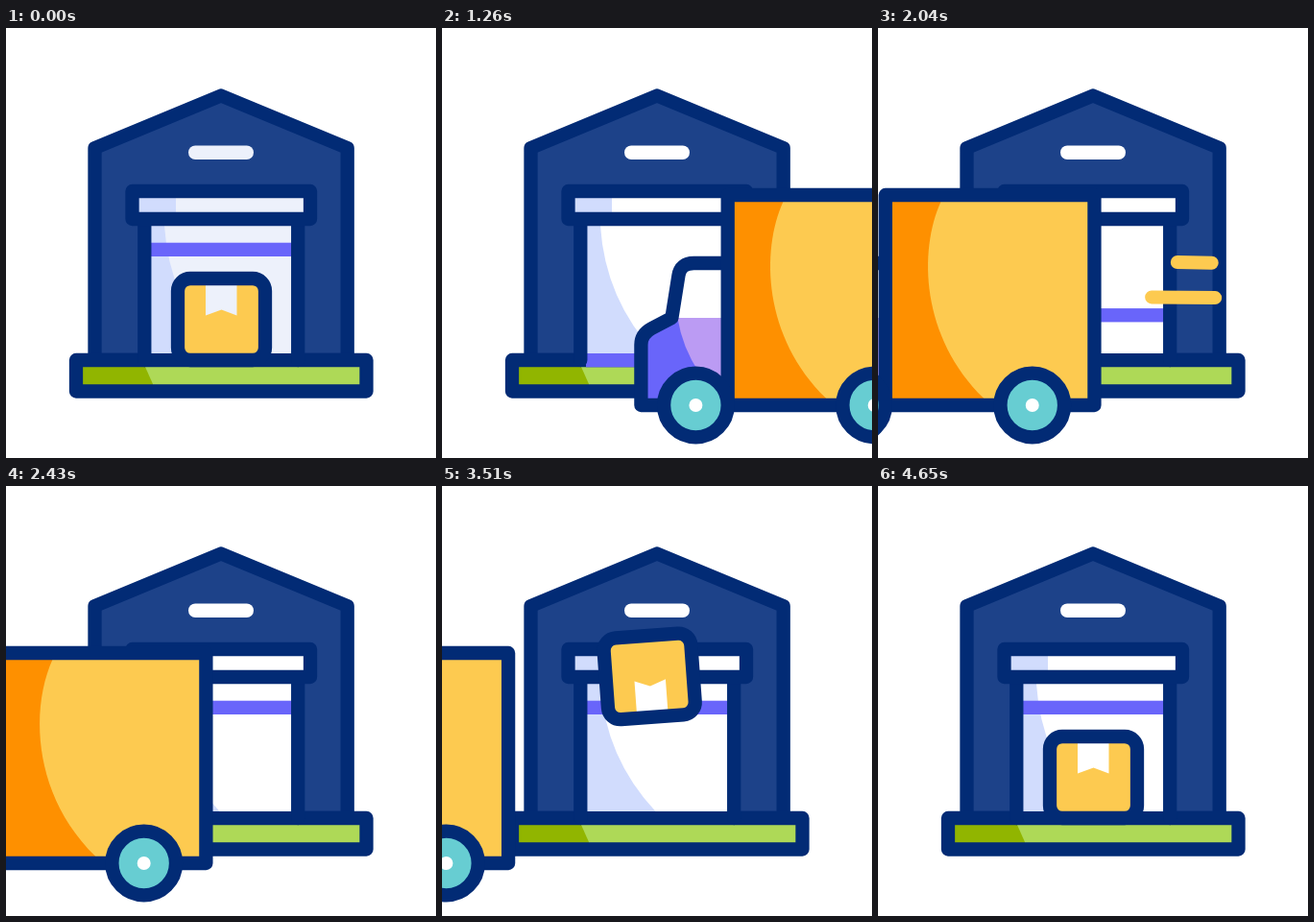
Animation of 448 by 448 pixels, one loop 5.4 s. Source, as an HTML page:

```html
<!DOCTYPE html>
<html lang="en">
<head>
<meta charset="utf-8">
<title>Warehouse delivery</title>
<style>
  html, body { margin: 0; width: 100%; height: 100%; overflow: hidden; background: #fff; }
  svg { display: block; width: 100vw; height: 100vh; }
  .line { stroke: #022b75; stroke-width: 14.3; stroke-linejoin: round; stroke-linecap: round; }
  .pale { fill: var(--pale); }
  .shade { fill: #d1dcfd; }
  .dash { stroke: #fdca50; stroke-linecap: round; fill: none; }
</style>
</head>
<body>
<svg viewBox="0 0 448 448">
  <defs>
    <clipPath id="underDoor"><rect id="gap" x="0" y="0" width="448" height="448"/></clipPath>
    <g id="wheel">
      <circle class="line" r="33.3" fill="#67cdd2"/>
      <circle r="7" fill="#fff"/>
    </g>
  </defs>

  <path class="line" fill="#1d4289" d="M92.5 346V125L224 70.5L355.7 125V346Z"/>
  <rect class="pale" x="190" y="122.5" width="68" height="14.5" rx="7.2"/>

  <rect x="73" y="346" width="302.5" height="32.5" fill="#aed957"/>
  <path fill="#91b500" d="M73 346H141L145 353L153 371V378H73Z"/>
  <rect class="line" x="73" y="346" width="302.5" height="32.5" fill="none"/>

  <rect class="pale" x="150" y="200" width="149" height="139"/>
  <path class="shade" d="M150 200H164.6L165 206Q170 283 222.5 339H150Z"/>
  <rect id="stripe" x="150" width="149" height="14.3" fill="#6965fa"/>
  <path class="line" d="M144.3 200V346M304.2 200V346"/>
  <rect class="pale" x="131.5" y="170" width="185.5" height="29"/>
  <rect class="shade" x="131.5" y="170" width="45.5" height="29"/>
  <rect class="line" x="131.5" y="170" width="185.5" height="29" fill="none"/>

  <g id="bursts"></g>
  <g clip-path="url(#underDoor)">
    <g id="parcel">
      <rect x="-45.5" y="-42.5" width="91" height="85" rx="13" fill="#fdca50"/>
      <path class="pale" d="M-16.5 -37H16V-4L0 -10L-16.5 -4Z"/>
      <rect class="line" x="-45.5" y="-42.5" width="91" height="85" rx="13" fill="none"/>
    </g>
  </g>
  <g id="trails"></g>

  <!-- The truck's origin is its rear edge -->
  <g id="truck">
    <g transform="translate(-366)">
      <path fill="#fff" d="M141 245H106Q92 245 90 258L83 302H141Z"/>
      <path fill="#6965fa" d="M83 302L62 313Q51 319 51 330V393H141V302Z"/>
      <path fill="#bb9bf3" d="M89 302Q94 333 112 360L141 380V302Z"/>
      <path class="line" fill="none" d="M141 245H106Q92 245 90 258L83 302L62 313Q51 319 51 330V393H141"/>
      <rect x="141.3" y="174" width="217.7" height="219" fill="#fdca50"/>
      <path fill="#fe9000" d="M141 174H202L199 181C176 232 178 322 244 386L250 393H141Z"/>
      <rect class="line" x="141.3" y="174" width="217.7" height="219" fill="none"/>
      <use href="#wheel" x="108" y="393"/>
      <use href="#wheel" x="294.3" y="393"/>
    </g>
  </g>
</svg>
<script>
const LOOP = 5400, STEP = 30;
const $ = id => document.getElementById(id);
const sq = v => v * v;
const mix = (a, b, p) => a + (b - a) * p;
const ease = (t, from, to) => {
  const p = Math.min(1, Math.max(0, (t - from) / (to - from)));
  return p * p * (3 - 2 * p);
};
const set = (el, attrs) => {
  for (const name in attrs) el.setAttribute(name, attrs[name]);
};

function addDash(parent, ends, width) {
  const el = document.createElementNS('http://www.w3.org/2000/svg', 'line');
  set(el, { class: 'dash', 'stroke-width': width });
  $(parent).append(el);
  return { el, ends };
}

// Shows the part of a dash between the fractions tail and head.
function trim({ el, ends: [x1, y1, x2, y2] }, tail, head) {
  set(el, {
    x1: mix(x1, x2, tail), y1: mix(y1, y2, tail),
    x2: mix(x1, x2, head), y2: mix(y1, y2, head),
    visibility: head - tail > 0.01 ? 'visible' : 'hidden'
  });
}

const trails = [[290, 243.7, 352, 244.7], [245, 280, 359, 281.2]]
  .map(ends => addDash('trails', ends, 14));
const bursts = [-1, 1].flatMap(side =>
  [[62, 270, 84, 249], [68, 300, 100, 300], [62, 330, 84, 347]].map(([a, y1, b, y2]) =>
    addDash('bursts', [220.5 + side * a, y1, 220.5 + side * b, y2], 8)));

function parcelPose(t) {
  if (t < 2910) return { x: 224.5, y: 303.5, turn: 0 };
  if (t < 3600) {
    const rise = ease(t, 2910, 3630);
    return { x: mix(112, 224.5, rise), y: mix(303.5, 190, rise), turn: 180 * ease(t, 2910, 3570) };
  }
  const fall = ease(t, 3600, 4140);
  return { x: 224.5, y: mix(190, 303.5, fall), turn: 180 + 180 * fall };
}

function draw(t) {
  document.documentElement.style.setProperty('--pale', t < 330 ? '#edf1fb' : '#fff');

  const door = 223.7 + 115.3 * (ease(t, 300, 810) - ease(t, 1830, 2310));
  set($('stripe'), { y: door });
  set($('gap'), { y: t < 900 ? door + 14 : 0 });

  const { x, y, turn } = parcelPose(t);
  set($('parcel'), {
    transform: `translate(${x} ${y}) rotate(${turn})`,
    visibility: t < 810 || t >= 2910 ? 'visible' : 'hidden'
  });

  const rear = 219 + sq(0.01763 * Math.max(0, 2248 - t)) - sq(0.00931 * Math.max(0, t - 2226));
  set($('truck'), { transform: `translate(${rear})` });

  trails.forEach(d => trim(d, ease(t, 1920, 2220), ease(t, 1830, 2080)));
  bursts.forEach(d => trim(d, ease(t, 4290, 4650), ease(t, 4110, 4380)));
}

const start = performance.now();
function tick() {
  const t = (performance.now() - start) % LOOP;
  draw(Math.floor(t / STEP) * STEP);
  requestAnimationFrame(tick);
}
tick();
</script>
</body>
</html>
```
